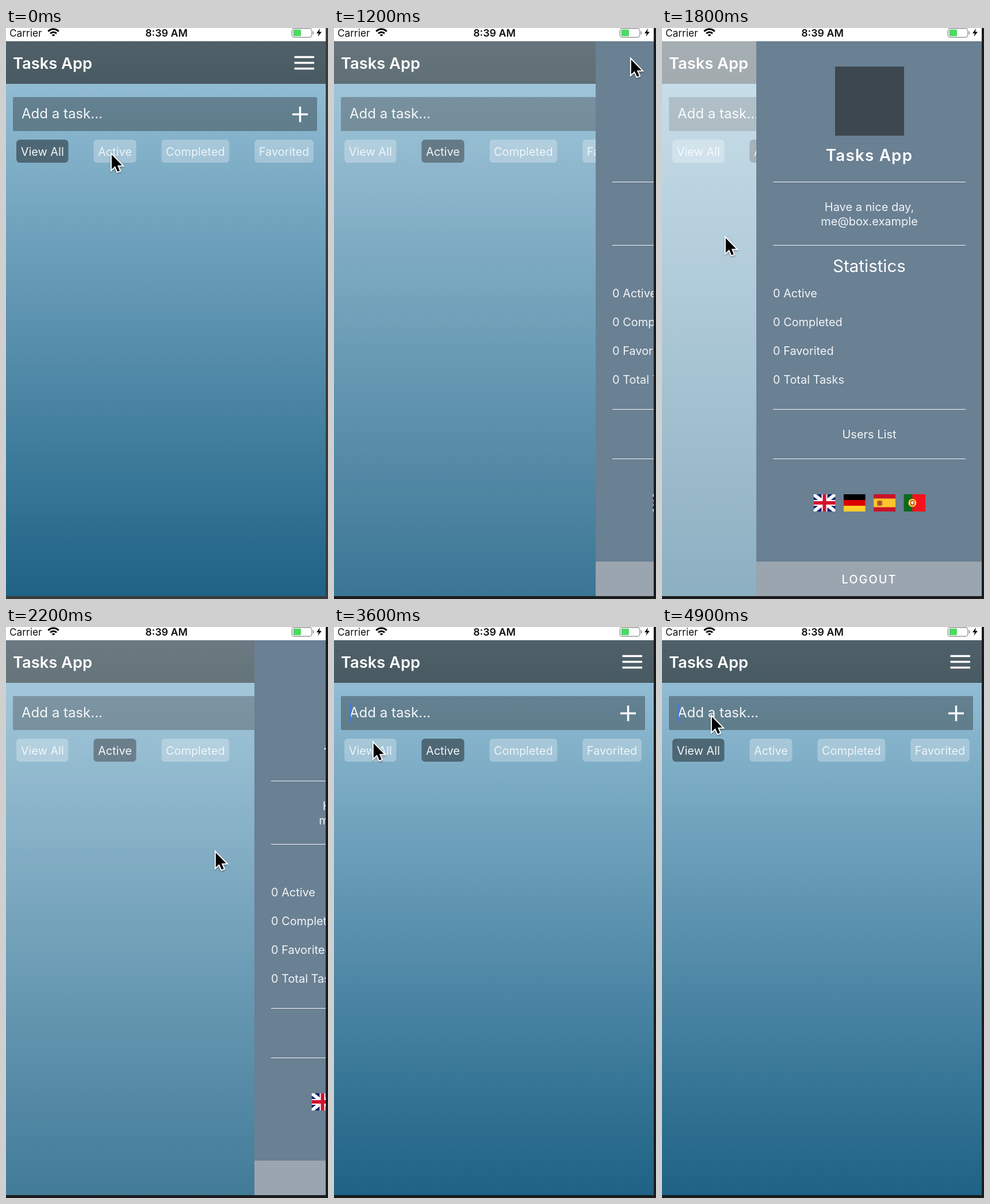
Write an HTML page with a canvas that moves like this. It is 560 px wide and 992 px high and loops after 5000 ms.

```html
<!DOCTYPE html>
<html lang="en">
<head>
<meta charset="utf-8">
<title>Tasks App</title>
<style>
  html, body { margin: 0; width: 100%; height: 100%; overflow: hidden; background: #1b1c1e; }
  canvas { display: block; }
</style>
</head>
<body>
<canvas id="stage" width="560" height="992"></canvas>
<script>
const ctx = document.getElementById('stage').getContext('2d');
const LOOP = 5000, STEP = 100;
const SCREEN_W = 556, SCREEN_H = 987;
const MENU_OPEN = 164, MENU_CLOSED = 557, MENU_W = MENU_CLOSED - MENU_OPEN;
const DRAG_START = 2000, DRAG_END = 2200, GRIP = 70;
const TRAVEL = 400;

// Places the pointer visits, with its time of arrival
const visits = [
  { at: 0, x: 181, y: 216 },
  { at: 100, x: 257, y: 11 },
  { at: 500, x: 190, y: 212 },
  { at: 1000, x: 514, y: 51 },
  { at: 1800, x: 108, y: 361 },
  { at: DRAG_START, x: 94, y: 390 },
  { at: DRAG_END, x: 362, y: 388 },
  { at: 2400, x: 174, y: 240 },
  { at: 2700, x: 84, y: 152 },
  { at: 3600, x: 66, y: 198 },
  { at: 4400, x: 84, y: 152 }
];

const clamp = u => Math.min(1, Math.max(0, u));
const progress = (t, from, to) => clamp((t - from) / (to - from));
const smooth = u => u * u * (3 - 2 * u);
const mix = (a, b, u) => a + (b - a) * u;

// The pointer rests at a place, then leaves in time to reach the next one
function cursorAt(t) {
  const i = visits.findLastIndex(v => v.at <= t);
  const here = visits[i], next = visits[i + 1] ?? here;
  const leave = Math.max(here.at, next.at - TRAVEL);
  const u = next === here ? 0 : smooth(progress(t, leave, next.at));
  return { x: mix(here.x, next.x, u), y: mix(here.y, next.y, u) };
}

// Slides open, follows the dragging pointer, then settles shut
function menuAt(t) {
  if (t < DRAG_START) return MENU_CLOSED - MENU_W * smooth(progress(t, 1100, 1400));
  const dragged = cursorAt(Math.min(t, DRAG_END)).x + GRIP;
  const remaining = (1 - progress(t, DRAG_END, DRAG_END + 280)) ** 3;
  return MENU_CLOSED - (MENU_CLOSED - dragged) * remaining;
}

function rect(x, y, w, h, fill, radius = 0) {
  ctx.fillStyle = fill;
  ctx.beginPath();
  ctx.roundRect(x, y, w, h, radius);
  ctx.fill();
}

function gradient(y0, y1, from, to) {
  const g = ctx.createLinearGradient(0, y0, 0, y1);
  g.addColorStop(0, from);
  g.addColorStop(1, to);
  return g;
}

function setFont(size, weight = 400, spacing = 0) {
  ctx.font = `${weight} ${size}px Inter, "Open Sans", sans-serif`;
  ctx.letterSpacing = spacing + 'px';
}

function text(str, x, y, size, { weight, align = 'left', color = '#fff', spacing } = {}) {
  setFont(size, weight, spacing);
  ctx.textAlign = align;
  ctx.fillStyle = color;
  ctx.fillText(str, x, y);
}

function polygon(points) {
  ctx.beginPath();
  points.forEach(([x, y]) => ctx.lineTo(x, y));
  ctx.closePath();
}

function line(x0, y0, x1, y1, width, color) {
  ctx.strokeStyle = color;
  ctx.lineWidth = width;
  ctx.beginPath();
  ctx.moveTo(x0, y0);
  ctx.lineTo(x1, y1);
  ctx.stroke();
}

function disc(x, y, r, fill) {
  ctx.fillStyle = fill;
  ctx.beginPath();
  ctx.arc(x, y, r, 0, Math.PI * 2);
  ctx.fill();
}

function drawStatusBar() {
  rect(0, 0, SCREEN_W, 23, '#fff');
  text('Carrier', 6, 14.5, 17.3, { color: '#111' });
  text('8:39 AM', 279, 14.5, 17.8, { weight: 600, align: 'center', color: '#111' });

  ctx.strokeStyle = '#000';
  ctx.lineWidth = 3;
  for (const r of [2.5, 7.7, 12.9]) {
    ctx.beginPath();
    ctx.arc(82.5, 15, r, -Math.PI * 0.75, -Math.PI * 0.25);
    ctx.stroke();
  }

  ctx.strokeStyle = '#999';
  ctx.lineWidth = 1.4;
  ctx.beginPath();
  ctx.roundRect(497.2, 0.7, 34.6, 15.6, 4);
  ctx.stroke();
  rect(499.5, 2.8, 13.5, 11.4, '#4cd964', 1.5);
  rect(533.5, 5.8, 2, 5.5, '#999', 1);
  polygon([[546, 1], [540, 9.3], [544, 9.3], [542.3, 15], [549, 6.8], [544.8, 6.8]]);
  ctx.fillStyle = '#000';
  ctx.fill();
}

// Buttons fit their labels and share the leftover width as equal gaps
function drawFilters(selected) {
  const left = 18, right = 535, padding = 7.7, size = 19.9;
  const labels = ['View All', 'Active', 'Completed', 'Favorited'];
  setFont(size);
  const widths = labels.map(s => ctx.measureText(s).width + padding * 2);
  const used = widths.reduce((a, b) => a + b);
  const gap = (right - left - used) / (labels.length - 1);
  let x = left;
  labels.forEach((label, i) => {
    const on = label === selected;
    rect(x, 194, widths[i], 40, on ? '#4e6775' : 'rgba(255,255,255,0.28)', 6);
    text(label, x + padding, 222, size, { color: on ? '#f2f5f7' : '#edf4f8' });
    x += widths[i] + gap;
  });
}

function drawMain(selected, caret) {
  rect(0, 23, SCREEN_W, SCREEN_H - 23, gradient(97, SCREEN_H, '#91bcd3', '#1e6285'));
  rect(0, 23, SCREEN_W, 74, gradient(23, 97, '#50606a', '#485a61'));
  text('Tasks App', 12, 71, 27.3, { weight: 600 });
  for (let i = 0; i < 3; i++) line(501.5, 50.5 + i * 10, 536, 50.5 + i * 10, 3.4, '#fff');

  rect(12, 120, 529, 59, gradient(120, 179, '#648192', '#607d8b'), 2);
  text('Add a task...', 27, 157, 24, { color: '#f3f6f8' });
  line(498, 150, 525, 150, 3.4, '#fff');
  line(511.5, 136.5, 511.5, 163.5, 3.4, '#fff');
  if (caret) rect(27, 132, 2.6, 34, '#4478d6', 1);
  drawFilters(selected);
}

function drawUnionFlag() {
  rect(0, 0, 38, 30, '#0b2470');
  line(0, 0, 38, 30, 6, '#fff');
  line(38, 0, 0, 30, 6, '#fff');
  for (const [width, color] of [[10, '#fff'], [6, '#d2122e']]) {
    line(19, 0, 19, 30, width, color);
    line(0, 15, 38, 15, width, color);
  }
}

function drawGermanFlag() {
  ['#000', '#dd0000', '#ffce2e'].forEach((c, i) => rect(0, i * 10, 38, 10, c));
}

function drawSpanishFlag() {
  rect(0, 0, 38, 30, '#c8142a');
  rect(0, 7.5, 38, 15, '#ffc52e');
  rect(6, 11, 9, 9, '#a8642c', 2);
  rect(9, 13, 3, 5, '#c9303a');
}

function drawPortugueseFlag() {
  rect(0, 0, 38, 30, '#f5121c');
  rect(0, 0, 15, 30, '#0a6a1c');
  disc(15, 15, 7, '#f5dc3c');
  rect(11.5, 10.5, 7, 9, '#e0262c', 2);
  rect(13, 12, 4, 5.5, '#fff', 1);
}

const flags = [drawUnionFlag, drawGermanFlag, drawSpanishFlag, drawPortugueseFlag];

function drawMenu(x) {
  const mid = MENU_W / 2;
  ctx.save();
  ctx.translate(x, 0);
  rect(0, 23, MENU_W, SCREEN_H - 23, '#6a8093');
  rect(0, 927, MENU_W, 60, '#9aa5af');

  rect(137, 67, 120, 120, '#3c4750');
  text('Tasks App', mid, 231, 27.8, { weight: 600, align: 'center', spacing: 1.2 });
  for (const y of [267.5, 377.5, 662.5, 748.5]) line(29, y, 364, y, 1.2, '#f4f6f8');

  const soft = { align: 'center', color: '#f1f4f6' };
  text('Have a nice day,', mid, 318, 20, soft);
  text('me@box.example', mid, 343, 20, soft);
  text('Statistics', mid, 424, 29.5, { align: 'center' });
  ['Active', 'Completed', 'Favorited', 'Total Tasks'].forEach((name, i) =>
    text('0 ' + name, 29, 468 + i * 50, 19.9, { color: '#f1f4f6' }));
  text('Users List', mid, 713, 20, soft);

  flags.forEach((draw, i) => {
    ctx.save();
    ctx.translate(99.5 + i * 52.3, 810);
    ctx.beginPath();
    ctx.rect(0, 0, 38, 30);
    ctx.clip();
    draw();
    ctx.restore();
  });
  text('LOGOUT', mid, 965, 20, { weight: 500, align: 'center', spacing: 2 });
  ctx.restore();
}

function drawCursor({ x, y }) {
  ctx.save();
  ctx.translate(x + 0.8, y + 0.5);
  polygon([[2, 3.5], [2, 29], [8, 23.6], [12.2, 33], [16, 31.4], [12, 22.2], [20, 22]]);
  ctx.shadowColor = 'rgba(0,0,0,0.35)';
  ctx.shadowBlur = 3;
  ctx.shadowOffsetY = 1.5;
  ctx.lineWidth = 4;
  ctx.strokeStyle = '#fff';
  ctx.stroke();
  ctx.shadowColor = 'transparent';
  ctx.fillStyle = '#000';
  ctx.fill();
  ctx.restore();
}

function render(t) {
  const menuX = menuAt(t);
  const openness = (MENU_CLOSED - menuX) / MENU_W;
  const selected = t >= 500 && t < 4000 ? 'Active' : 'View All';
  const caret = t >= 2800 && (t - 2800) % 700 < 500;

  drawMain(selected, caret);
  rect(0, 23, SCREEN_W, SCREEN_H - 23, `rgba(255,255,255,${openness * 0.49})`);
  drawMenu(menuX);
  drawStatusBar();
  const edge = t < 300 ? '#3a3b3d' : '#1b1c1e';
  rect(SCREEN_W, 0, 4, 992, edge);
  rect(0, SCREEN_H, 560, 5, edge);
  drawCursor(cursorAt(t));
}

const start = performance.now();
function tick() {
  const t = (performance.now() - start) % LOOP;
  render(Math.floor(t / STEP) * STEP);
  requestAnimationFrame(tick);
}
tick();
</script>
</body>
</html>
```
